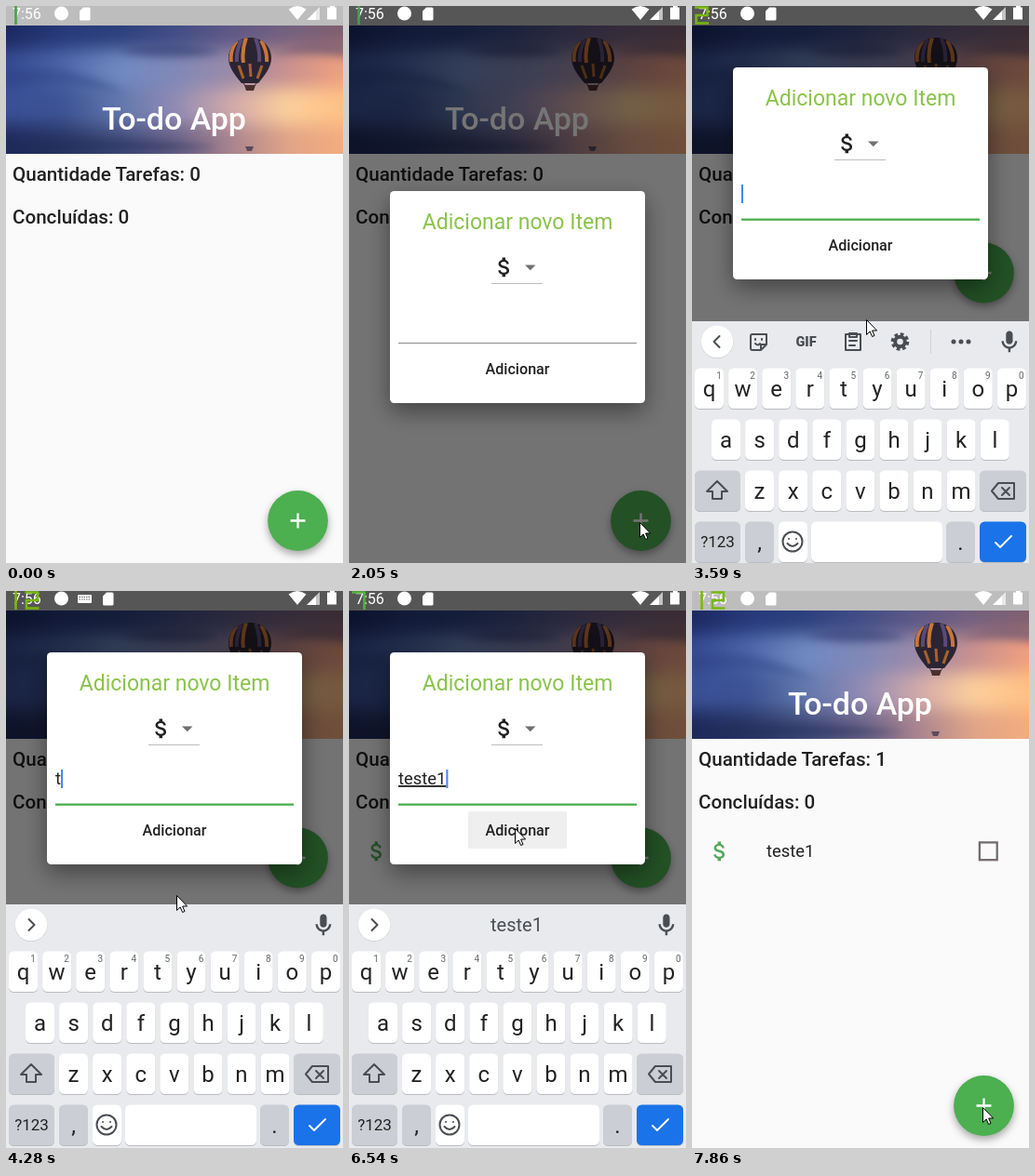
An HTML page for the animation above (8000 ms loop, 362x599 px).

```html
<!DOCTYPE html>
<html lang="pt">
<head>
<meta charset="utf-8">
<title>To-do App</title>
<style>
html, body { margin: 0; width: 100%; height: 100%; overflow: hidden; background: #fafafa; }
svg { display: block; width: 362px; height: 599px; font-family: Roboto, sans-serif; }
.mid { text-anchor: middle; }
.medium { font-weight: 500; }
.soft { filter: blur(9px); }
.cloud { filter: blur(4px); }
.fab { filter: drop-shadow(0 4px 4px rgba(0, 0, 0, .34)); }
.sheet { filter: drop-shadow(0 9px 13px rgba(0, 0, 0, .42)); }
.line { fill: none; stroke: #4a4d51; stroke-width: 2; stroke-linejoin: round; stroke-linecap: round; }
</style>
</head>
<body>
<svg viewBox="0 0 362 599">
  <defs>
    <clipPath id="photoClip"><path d="M0 21h362v138H0z"/></clipPath>
    <clipPath id="envelope"><path id="balloonShape" d="M262 34c14 0 23 10 23 22 0 10-7 18-14 27h-18c-7-9-14-17-14-27 0-12 9-22 23-22z"/></clipPath>
    <path id="dollar" d="M11.8 10.9c-2.27-.59-3-1.2-3-2.15 0-1.09 1.01-1.85 2.7-1.85 1.78 0 2.44.85 2.5 2.1h2.21c-.07-1.72-1.12-3.3-3.21-3.81V3h-3v2.16c-1.94.42-3.5 1.68-3.5 3.61 0 2.31 1.91 3.46 4.7 4.13 2.5.6 3 1.48 3 2.41 0 .69-.49 1.79-2.7 1.79-2.06 0-2.87-.92-2.98-2.1h-2.2c.12 2.19 1.76 3.42 3.68 3.83V21h3v-2.15c1.95-.37 3.5-1.5 3.5-3.55 0-2.84-2.43-3.81-4.7-4.4z"/>
  </defs>

  <rect width="362" height="599" fill="#fafafa"/>
  <g clip-path="url(#photoClip)">
    <g id="sky" class="soft"></g>
    <g class="cloud">
      <path d="M120 48q60-14 112 2-60 10-112-2z" fill="#343f74" opacity=".6"/>
      <path d="M285 52q40-18 85-10v14q-40-8-85-4z" fill="#6b5570" opacity=".6"/>
      <path d="M0 70q60-14 130 24-70-14-130-8z" fill="#2b3f80" opacity=".4"/>
      <path d="M0 148q90-12 230 4-90 8-230 8z" fill="#1d2856" opacity=".45"/>
    </g>
    <path d="M257 151h9l-2 5h-5z" fill="#5d4a5e"/>
    <use href="#balloonShape" fill="#2b2433"/>
    <g clip-path="url(#envelope)" fill="none" stroke-width="4">
      <path d="M248 37q-8 12-6 23M258 34q-5 14-3 27M274 37q7 12 6 23" stroke="#c9763a"/>
      <path d="M253 36q-6 12-5 24M268 35q5 12 4 25" stroke="#5a4a78"/>
      <path d="M262 62l1 14M250 64l5 14M275 64l-5 14" stroke="#a8622f" stroke-width="3"/>
    </g>
    <path d="M255 83l3 4M269 83l-3 4" stroke="#33273a"/>
    <path d="M256 85h12l-2 6h-8z" fill="#4a2f2e"/>
  </g>
  <text class="mid medium" x="180.5" y="133" font-size="34" fill="#fff">To-do App</text>
  <rect width="362" height="21" fill="#bdbdbd"/>
  <g class="medium" font-size="20.6" fill="#212121">
    <text id="total" x="7" y="187.5"></text>
    <text x="7" y="233.5">Concluídas: 0</text>
  </g>
  <g id="item">
    <use href="#dollar" transform="translate(16 266) scale(1.155)" fill="#56a85b"/>
    <text x="80" y="286" font-size="18.4" fill="#212121">teste1</text>
    <rect x="308.9" y="270.4" width="18.8" height="18.8" fill="none" stroke="#736c6e" stroke-width="2.3"/>
  </g>
  <g id="fab">
    <circle class="fab" cx="313.5" cy="553.5" r="32.4" fill="#4caf50"/>
    <path d="M305.5 553.5h16M313.5 545.5v16" stroke="#fff" stroke-width="2.3"/>
  </g>

  <rect id="barrier" width="362" height="599"/>
  <g id="dialog">
    <rect class="sheet" x="44" y="199" width="274" height="228" rx="4.5" fill="#fff"/>
    <text class="mid" x="181" y="239.5" font-size="23" fill="#8bc34a">Adicionar novo Item</text>
    <use href="#dollar" transform="translate(153 267) scale(1.155)" fill="#212121"/>
    <path d="M189 278.5h11.5l-5.75 5.8z" fill="#707070"/>
    <path d="M153 298.5h55" stroke="#bdbdbd"/>
    <text x="53" y="341" font-size="18.4" fill="#212121"><tspan id="marked" text-decoration="underline"></tspan><tspan id="plain"></tspan></text>
    <rect id="caret" y="325" width="2" height="20" fill="#4285f4"/>
    <rect id="fieldLine" x="53" width="256"/>
    <rect id="press" x="128" y="370" width="106" height="40" rx="2" fill="#efefef"/>
    <text class="mid medium" x="181" y="396" font-size="16.1" fill="#212121">Adicionar</text>
  </g>

  <g id="keyboard">
    <rect y="337" width="362" height="270" fill="#e8eaed"/>
    <circle cx="27" cy="359.5" r="17.5" fill="#c9cbcf"/>
    <circle cx="27" cy="359" r="17.3" fill="#fff"/>
    <path id="chevron" class="line"/>
    <g id="tools">
      <path class="line" d="M65 351h15v11l-6 6h-9q-2 0-2-2v-13q0-2 2-2zM80 362h-6v6M68 356v1M75 356v1M68 361q3 3 5 0"/>
      <text class="mid" x="122.5" y="364" font-size="14.5" font-weight="900" fill="#4a4d51">GIF</text>
      <path class="line" d="M165 351h16v17h-16zM169 350h8v4h-8zM169 358h8M169 363h6"/>
      <circle cx="223.5" cy="359" r="8" fill="none" stroke="#4a4d51" stroke-width="3.5" stroke-dasharray="3.6 2.68"/>
      <circle cx="223.5" cy="359" r="5.3" fill="none" stroke="#4a4d51" stroke-width="4"/>
      <path d="M256.5 346v26" stroke="#cfd1d5"/>
      <path d="M281 359h.01M289 359h.01M297 359h.01" stroke="#4a4d51" stroke-width="5" stroke-linecap="round"/>
    </g>
    <g id="hints" class="mid" font-size="20" fill="#4a4d51">
      <text x="90" y="366"></text><text x="180" y="366"></text><text x="270" y="366"></text>
    </g>
    <path transform="translate(326.5 345) scale(1.2)" fill="#4a4d51" d="M12 14c1.66 0 3-1.34 3-3V5c0-1.66-1.34-3-3-3S9 3.34 9 5v6c0 1.66 1.34 3 3 3zm5-3c0 2.76-2.24 5-5 5s-5-2.24-5-5H5c0 3.53 2.61 6.43 6 6.92V21h2v-3.08c3.39-.49 6-3.39 6-6.92h-2z"/>
    <g id="keys"></g>
    <g class="line">
      <path d="M27 509l11 11h-6v8h-10v-8h-6z"/>
      <path d="M329 511h17v17h-17l-7-8.5zM333 516l8 8M341 516l-8 8"/>
      <circle cx="108" cy="574" r="10.5"/>
      <path d="M104 571h.01M112 571h.01M102.5 576q5.5 6 11 0"/>
      <path d="M326 575l5 5 12-12" stroke="#fff"/>
    </g>
  </g>

  <g fill="#fff">
    <text x="7" y="14" font-size="16">7:56</text>
    <circle cx="59.5" cy="8" r="7.5"/>
    <g id="imeIcon"><rect x="77" y="4" width="15" height="9" rx="1"/><path d="M78.5 6.5h12M78.5 9h12" stroke="#666" stroke-width="1.2" stroke-dasharray="1.5 1"/></g>
    <path id="card" d="M83 1.5h6q1.5 0 1.5 1.5v11q0 1.5-1.5 1.5h-8.500q-1.5 0-1.5-1.5V5.5z"/>
    <path d="M313 15l-9.5-11.5q9.5-7 19 0zM333 5v10h-10zM348 1.5v-1.5h5v1.5h2v13h-10v-13z"/>
    <path d="M333 5l4-4v14h-4z" opacity=".65"/>
  </g>
  <g id="meter"></g>
  <g id="ring" fill="none"><circle r="11" stroke="#000"/><circle r="10" stroke="#fff"/></g>
  <path id="cursor" d="M.5 .5v16l3.7-3.5 2.4 5.5 2.4-1-2.4-5.5h5z" fill="#fff" stroke="#000"/>
</svg>
<script>
const LOOP = 8000;
const $ = id => document.getElementById(id);
const show = (id, on) => $(id).setAttribute('visibility', on ? 'visible' : 'hidden');
const shift = (id, x, y) => $(id).setAttribute('transform', `translate(${x} ${y})`);
const set = (id, attrs) => { for (const k in attrs) $(id).setAttribute(k, attrs[k]); };

// Sky: blurred bands, each shaded from left to right: [top, height, colours]
const BANDS = [
  [-20, 67, '#1b2962 #27397a #2c407e #414d85 #5e5886 #74617f #80606f'],
  [46, 43, '#35498f #4c66a8 #7089c2 #7f88b8 #9a8aa8 #c9908f #f0a07e'],
  [88, 41, '#3a5095 #3c5293 #6177ad #8f8ab4 #d0a8aa #fccf9c #ffc084'],
  [128, 70, '#1d2a5c #2a3868 #444f7e #6a6389 #a8838f #e0a488 #f3ad7e']];
$('sky').innerHTML = BANDS.map(([y, height, colors], i) => `
  <linearGradient id="band${i}" gradientUnits="userSpaceOnUse" x1="0" x2="362">
    ${colors.split(' ').map((c, k, all) => `<stop offset="${k / (all.length - 1)}" stop-color="${c}"/>`).join('')}
  </linearGradient>
  <rect x="-40" y="${y}" width="442" height="${height}" fill="url(#band${i})"/>`).join('');

// Keyboard
const PITCH = 36.1, KEY_H = 43.5;
function key(x, y, w, label = '', fill = '#fff', size = 24, hint = '') {
  const c = x + w / 2;
  return `<rect x="${x}" y="${y + 1}" width="${w}" height="${KEY_H}" rx="5.5" fill="#babcc1"/>
    <rect x="${x}" y="${y}" width="${w}" height="${KEY_H}" rx="5.5" fill="${fill}"/>
    <text class="mid" x="${c}" y="${y + 22 + size * .35}" font-size="${size}" fill="#222">${label}</text>
    <text class="mid" x="${c + 10.5}" y="${y + 11}" font-size="10" fill="#666">${hint}</text>`;
}
const row = (letters, x, y, hints = '') =>
  [...letters].map((ch, i) => key(x + i * PITCH, y, 31, ch, '#fff', 24, hints[i])).join('');
const GREY = '#ccced5';
$('keys').innerHTML =
  row('qwertyuiop', 3, 387.5, '1234567890') + row('asdfghjkl', 21, 442.5) + row('zxcvbnm', 57, 497.5) +
  key(3, 497.5, 49, '', GREY) + key(309, 497.5, 50, '', GREY) +
  key(3, 552.5, 49, '?123', GREY, 17) + key(57, 552.5, 31, ',', GREY) + key(93, 552.5, 31) +
  key(128, 552.5, 141) + key(273, 552.5, 31, '.', GREY) + key(309, 552.5, 50, '', '#1a73e8');

// Refresh-rate meter in seven-segment digits
const SEGMENTS = {
  1: 'M8.5 0v20', 2: 'M0 1.5h13.5v8.5h-12v8.5h13.5',
  3: 'M0 1.5h13.5v17h-13.5M0 10h13.5', 7: 'M0 1.5h13.5v18.5'
};
const drawMeter = ([text, color]) => [...text].map((d, i) =>
  `<path d="${SEGMENTS[d]}" transform="translate(${3 + 17.5 * i - (d === '1' ? 1 : 0)} 0)" fill="none" stroke="${color}" stroke-width="2.6"/>`).join('');

// Timed states: [start, value]
const at = (table, t) => table.reduce((v, [start, value]) => t >= start ? value : v, table[0][1]);
const METER = [[0, ['1', '#45a04a']], [3130, ['2', '#78b80c']], [3900, ['12', '#78b80c']],
  [4510, ['33', '#62b81c']], [5590, ['7', '#55b03c']], [6710, ['12', '#78b80c']]];
const TYPED = [[0, 0], [4210, 1], [4290, 2], [4360, 3], [4440, 4], [4510, 5], [4900, 6]];
const MARKED = [[0, 0], [4670, 5], [5050, 6]];
const HINTS = [[0, ['', '', '']], [4670, ['testes', 'teste', 'testers']], [5050, ['', 'teste', '']], [5130, ['', 'teste1', '']]];
const CARET = [[0, false], [3130, true], [3670, false], [4210, true], [5590, false], [6130, true], [6630, false]];
const FADE = [[0, 0], [2050, 1], [6630, .5], [6710, 0]];
const LIFT = [[0, 0], [3510, .7], [3590, 1], [6710, 0]];
const KEYBOARD_Y = [[0, 270], [3510, 95], [3590, 2], [3670, 0], [6630, 130], [6710, 270]];

// Pointer moves: [first step, last step, step count, x, y]
const START = [289, 579];
const MOVES = [
  [70, 430, 6, 196, 378], [810, 1350, 8, 312, 555], [2510, 2980, 7, 195, 327],
  [3130, 3440, 5, 191, 330], [3510, 3590, 2, 187, 337], [3670, 3900, 4, 183, 327],
  [5280, 5360, 2, 189, 308], [5440, 5590, 3, 178, 247], [5820, 5900, 2, 178, 255],
  [6850, 7620, 11, 310, 544], [7690, 7860, 3, 312, 555]];
const smooth = p => p * p * (3 - 2 * p);
function pointer(t) {
  let [x, y] = START;
  for (const [first, last, n, toX, toY] of MOVES) {
    if (t < first) break;
    const step = Math.floor((t - first) / ((last - first) / (n - 1)) + 1e-6) + 1;
    const p = smooth(Math.min(1, step / n));
    x += (toX - x) * p;
    y += (toY - y) * p;
  }
  return [Math.round(x), Math.round(y)];
}

function render(t) {
  const added = t >= 6280, focused = t >= 3130, typing = t >= 4210;
  $('total').textContent = `Quantidade Tarefas: ${added ? 1 : 0}`;
  show('item', added);

  const fade = at(FADE, t), lift = at(LIFT, t);
  set('barrier', { opacity: .54 * fade });
  set('dialog', { opacity: fade });
  shift('dialog', 0, -133 * lift);
  shift('fab', 0, lift ? -266.5 : 0);
  show('press', t >= 6280);

  const typed = 'teste1'.slice(0, at(TYPED, t)), marked = Math.min(at(MARKED, t), typed.length);
  $('marked').textContent = typed.slice(0, marked);
  $('plain').textContent = typed.slice(marked);
  const width = $('marked').parentNode.getComputedTextLength();
  set('caret', { x: 53 + (typed ? width : 0) });
  show('caret', at(CARET, t));
  set('fieldLine', focused ? { y: 361.5, height: 2.3, fill: '#4caf50' } : { y: 362, height: 1, fill: '#8a8a8a' });

  shift('keyboard', 0, at(KEYBOARD_Y, t));
  set('chevron', { d: typing ? 'M24.5 353l6 6-6 6' : 'M29.5 353l-6 6 6 6' });
  show('tools', !typing);
  at(HINTS, t).forEach((word, i) => { $('hints').children[i].textContent = word; });

  const ime = t >= 4210 && t < 5590;
  show('imeIcon', ime);
  shift('card', ime ? 25 : 0, 0);
  $('meter').innerHTML = drawMeter(at(METER, t));

  const [x, y] = pointer(t);
  shift('cursor', x, y);
  show('cursor', t >= 70);
  shift('ring', x, y);
  show('ring', t >= 1520 && t < 1590);
}

const begin = performance.now();
function tick() {
  render((performance.now() - begin) % LOOP);
  requestAnimationFrame(tick);
}
tick();
</script>
</body>
</html>
```
